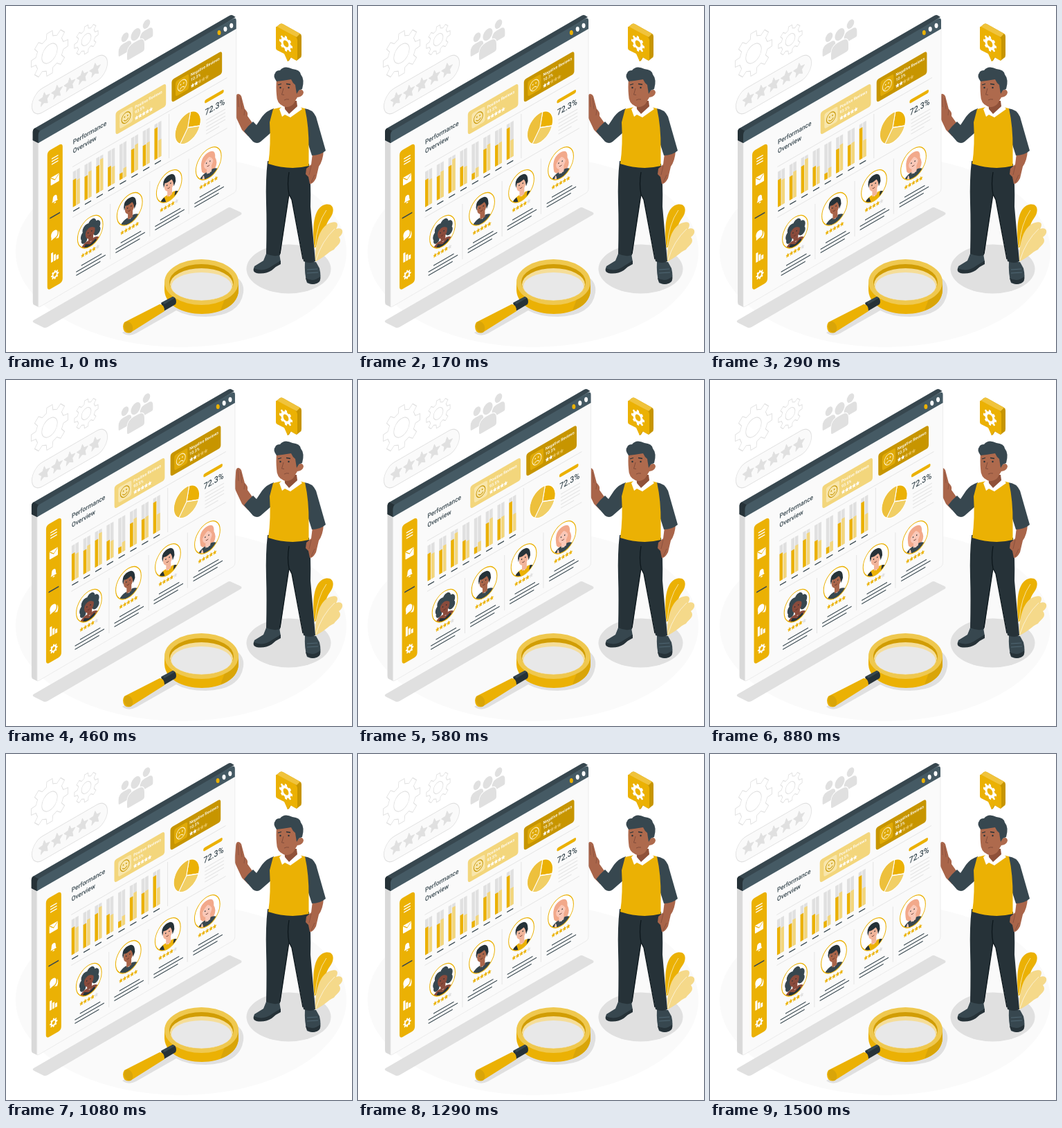
Animation of 500x500 px, one loop 1540 ms. Source, as an HTML page:

```html
<!DOCTYPE html>
<html lang="en">
<head>
<meta charset="utf-8">
<title>Performance overview</title>
<style>
  html, body { margin: 0; width: 100%; height: 100%; overflow: hidden; background: #fff; }
  svg { display: block; width: 100%; height: 100%; }
  text { font-family: Roboto, Inter, sans-serif; font-weight: 500; }
</style>
</head>
<body>
<svg viewBox="0 0 500 500">
  <defs><clipPath id="disc"><path d="M-21-30H21V0A21 21 0 0 1-21 0Z"/></clipPath></defs>

  <!-- floor and shadows -->
  <ellipse cx="253" cy="355" rx="239" ry="138" fill="#fafafa"/>
  <g fill="#e0e0e0">
    <path d="M40 454 320 292q3-2 6 0l13 6q3 2 0 4L60 464q-4 2-7 0l-12-6q-4-2-1-4Z"/>
    <ellipse cx="408.500" cy="380" rx="61" ry="35.500"/>
    <path d="M168 472 236 433Q226 412 250 390H330Q345 398 343 414 338 448 288 449 262 449 246 440L188 473Q177 479 168 472Z"/>
  </g>

  <g id="icons"></g>

  <!-- plant -->
  <path d="M446 350C442 322 444 291 461 287 474 284 476 297 468 307 459 319 463 330 446 350Z" fill="#ebb104"/>
  <path d="M447 369C446 344 453 317 470 313 481 310 480 318 477 322 488 318 489 329 481 334 487 342 478 346 474 352 466 355 458 365 447 369Z" fill="#f5d98a"/>
  <path d="M447 347Q449 315 463 295M448 367Q456 340 475 322" fill="none" stroke="#fff" stroke-width=".6"/>

  <!-- magnifier -->
  <path d="M229 399V411C230 433 256 445 283 445S335 433 336 411V399Z" fill="#ebb104"/>
  <path d="M310 440Q335 431 336 411V399H325Z" fill="#d9a508"/>
  <ellipse cx="282.500" cy="399" rx="53.500" ry="33" fill="#efc84f"/>
  <ellipse cx="282.500" cy="399.500" rx="46.500" ry="26.500" fill="#d19d04"/>
  <ellipse cx="282.500" cy="402.500" rx="45.500" ry="23.500" fill="#f5dd98"/>
  <ellipse cx="282.500" cy="405" rx="43.500" ry="20" fill="#e8e8e8"/>
  <path d="M224 429 241 420Q246 421 246 428L245 431 228 441Z" fill="#263238"/>
  <path d="M226 428 241 420 244 422 229 431Z" fill="#37474f"/>
  <path d="M171 457 222 431Q229 431 229 441L183 470Q176 475 171 470 167 463 171 457Z" fill="#ebb104"/>
  <ellipse cx="177" cy="464" rx="6" ry="8.500" transform="rotate(-20 177 464)" fill="#d9a508"/>

  <!-- man -->
  <path d="M376 358 395 358 397 370Q390 374 384 380 374 387 362 385 356 382 359 376L372 368Z" fill="#37474f"/>
  <path d="M358 379Q372 385 384 376L397 368V373Q390 376 384 382 374 388 362 386 356 384 358 379Z" fill="#263238"/>
  <path d="M432 369 448 370 453 379Q456 392 453 398 445 405 435 400 431 388 432 369Z" fill="#37474f"/>
  <path d="M433 393Q444 400 454 391 456 401 443 402 434 401 433 393Z" fill="#263238"/>
  <path d="M435 381 450 380M435 386 451 385" stroke="#607d8b" stroke-width=".6"/>
  <path d="M378 224 438 228Q441 255 440 290L447 369Q440 373 430 369L413 280 409 272 396 360Q387 363 376 358 377 315 376 285 375 250 378 224Z" fill="#263238"/>
  <path d="M409 240Q406 258 409 272L413 280 429 366M409 272 396 358" fill="none" stroke="#0d171c" stroke-width="1.300"/>
  <path d="M443 213 459 209Q458 224 452 232L448 249Q443 258 439 257L437 247 433 243 434 235 441 229Z" fill="#a9654a"/>
  <path d="M441 231 438 244M446 244 441 255" stroke="#7c4939" stroke-width=".7"/>
  <path d="M431 148Q443 149 448 160L462 209Q454 216 442 216L433 188Z" fill="#37474f"/>
  <path d="M350 188 341 179 333 162Q328 152 331 146L332 134Q332 128 335 127 340 127 341 134L345 149Q350 153 349 159L359 173Z" fill="#a9654a"/>
  <path d="M335 130 336 146M339 133 341 149M345 149 344 158" stroke="#7c4939" stroke-width=".6"/>
  <path d="M387 148Q377 151 370 160L362 172 357 167Q350 173 344 181L357 196Q363 200 368 196L384 182Z" fill="#37474f"/>
  <path d="M386 149 399 146 423 146 432 148Q438 175 437.500 207V231Q410 238 379 228 383 200 381 168Z" fill="#ebb104"/>
  <path d="M395 149 401 143 421 140 428 149 411 161 403 157 399 160Z" fill="#fff"/>
  <path d="M402 137H420L421 145 409 156 403 149Z" fill="#8f5139"/>
  <path d="M391 105Q390 118 391 128 391 141 401 145 408 148 415 142L421 132Q429 131 430 125 429 119 423 122L420 104Z" fill="#ae6a4d"/>
  <path d="M391 109Q385 101 389 97 390 93 396 93 402 85 414 91 425 92 426 99 432 106 428 120L423 122 420 127 418 114Q414 111 412 106 400 108 391 109Z" fill="#37474f"/>
  <path d="M393 114 398 112.500M405 112.500 411 113.500" stroke="#263238" stroke-width="1.300"/>
  <circle cx="396.500" cy="118" r="1.200" fill="#263238"/><circle cx="408.500" cy="118" r="1.200" fill="#263238"/>
  <path d="M401 119 398.500 128 402 128.500M402 136Q405 134 409 135" fill="none" stroke="#7c4939" stroke-width=".9"/>

  <!-- settings bubble -->
  <path d="M390 31 396 26Q398 25 400 26L425 40Q427 41 427 44V71Q427 74 425 75L420 79 412 74 409 79 407 80Z" fill="#c79500"/>
  <path d="M390 31 396 26Q398 25 400 26L425 40 420 45Z" fill="#f0c33c"/>
  <path d="M392 30 418 44Q421 46 421 49V76Q421 79 418 78L411 74 407 80 402 69 392 64Q390 63 390 61V32Q390 29 392 30Z" fill="#ebb104"/>
  <g id="cog"></g>

  <!-- browser window -->
  <g id="win">
    <path d="M39 191 47 197V435L41 432Q39 431 39 428Z" fill="#d9d9d9"/>
    <path d="M47 197 333 32V264Q333 268 330 270L52 433Q49 435 47 435Z" fill="#fafafa" stroke="#e6e6e6" stroke-width=".7"/>
    <path d="M39 182Q39 178 42 176.500L323 14Q326 12.500 328 13.500L332 16 60 188 47 198 39 194Z" fill="#37474f"/>
    <path d="M39 182Q39 178 42 176.500L50 181 47 186V198L39 194Z" fill="#263238"/>
    <path d="M47 187Q47 182 50 180L328 18.500Q333 16 333 21V33L47 198Z" fill="#455a64"/>
    <ellipse cx="308.300" cy="38.500" rx="2.500" ry="3.600" fill="#ebb104"/>
    <ellipse cx="317.200" cy="33.300" rx="2.500" ry="3.600" fill="#fff"/>
    <ellipse cx="326" cy="28.300" rx="2.500" ry="3.600" fill="#fff"/>
    <g id="page" transform="matrix(.866 -.5 0 1 47 199)"></g>
  </g>
</svg>

<script>
const $ = id => document.getElementById(id);
const gold = '#ebb104', pale = '#f3d67c', dark = '#37474f', grey = '#e0e0e0';

// ---- shape helpers ----
const polar = (r, a) => [r * Math.cos(a), r * Math.sin(a)].map(v => v.toFixed(2));
const star = (x, y, r, fill) => {
  const pts = Array.from({ length: 10 }, (_, i) => polar(i % 2 ? r * .48 : r, (i / 5 - .5) * Math.PI));
  return `<polygon transform="translate(${x} ${y})" points="${pts.join(' ')}" fill="${fill}" stroke="${fill}" stroke-width="${r * .12}" stroke-linejoin="round"/>`;
};
const gear = (r, hole, attrs, teeth = 8) => {
  const pts = [];
  for (let i = 0; i < teeth; i++)
    [[.76, -.30], [1, -.19], [1, .19], [.76, .30]].forEach(([k, d]) => pts.push(polar(r * k, (i + d) / teeth * 2 * Math.PI)));
  return `<path fill-rule="evenodd" stroke-linejoin="round" ${attrs} d="M${pts.join('L')}ZM${hole} 0A${hole} ${hole} 0 1 0 -${hole} 0A${hole} ${hole} 0 1 0 ${hole} 0Z"/>`;
};
const rect = (x, y, w, h, fill, rx = 0, more = '') =>
  `<rect x="${x}" y="${y}" width="${w}" height="${h}" rx="${rx}" fill="${fill}" ${more}/>`;
const line = (x1, y1, x2, y2, color, w) =>
  `<path d="M${x1} ${y1}L${x2} ${y2}" stroke="${color}" stroke-width="${w}"/>`;
const label = (x, y, size, fill, s) => `<text x="${x}" y="${y}" font-size="${size}" fill="${fill}">${s}</text>`;
const at = (x, y, s) => `<g transform="translate(${x} ${y})">${s}</g>`;
const iso = (x, y, s, dir = -1) => `<g transform="matrix(.866 ${dir * .5} 0 1 ${x} ${y})">${s}</g>`;
const stars = (x, y, gap, r, n, on, off) =>
  [0, 1, 2, 3, 4].map(i => star(x + i * gap, y, r, i < n ? on : off)).join('');
const person = k => `<g transform="scale(${k})"><ellipse cy="-15" rx="8.500" ry="8.500"/>
  <path d="M-15 14V7Q-15-4-4-4H4Q15-4 15 7V14Q15 17 12 17H-12Q-15 17-15 14Z"/></g>`;

// ---- loose icons ----
const thin = `fill="#fff" stroke="${grey}" stroke-width="1"`;
$('icons').innerHTML =
  iso(63, 68.500, gear(31, 13, thin)) + iso(116, 48.500, gear(20, 8, thin)) +
  iso(92, 113.500, rect(-63, -17.500, 126, 35, '#fafafa', 17.500, `stroke="${grey}"`) +
    stars(-42.400, 0, 21.200, 9.500, 5, grey)) +
  `<g fill="${grey}">${iso(203, 37, person(.72)) + iso(172, 56, person(.72))}
   <g stroke="#fff" stroke-width="2" paint-order="stroke">${iso(187.500, 55.500, person(.96))}</g></g>`;
$('cog').innerHTML = iso(404.500, 54.500, gear(11, 4.500, 'fill="#fff"'), 1);

// ---- page parts, in the plane of the window ----
const sidebar = () => rect(15, 19, 25.500, 201, gold, 5) + at(27.700, 0,
  [33, 37, 41].map(y => line(-5.500, y, 5.500, y, '#fff', 1.500)).join('') +
  rect(-7, 59.500, 14, 11.500, '#fff', 1) + `<path d="M-6.500 60.500 0 66 6.500 60.500" fill="none" stroke="${gold}"/>` +
  '<path d="M-5 97Q-3.500 96-3.500 92A3.500 4 0 0 1 3.500 92Q3.500 96 5 97ZM-1.500 98H1.500V99.500H-1.500Z" fill="#fff"/>' +
  line(-8.500, 117.500, 8.500, 117.500, dark, 1.800) +
  '<circle cx="-1" cy="144" r="5.500" fill="#fff"/><path d="M-6 151V145L0 149ZM1 151Q7 150 6 142 9 148 6 153Z" fill="#fff"/>' +
  rect(-6.500, 169, 3.500, 13.500, '#fff') + rect(-2, 173.500, 3.500, 9, '#fff') + rect(2.500, 176.500, 3.500, 6, '#fff') +
  at(0, 203, gear(6.500, 2.600, 'fill="#fff"')));

const card = (x, fill, tile, ink, title, value, n, dim, mouth) => at(x, 19,
  rect(0, 0, 84, 33, fill, 4) + rect(6.500, 5.500, 22, 22, tile, 3) +
  `<g fill="none" stroke="${ink}" stroke-width="1.100"><circle cx="17.500" cy="16.500" r="7.500"/><path d="${mouth}"/></g>
   <circle cx="15" cy="14.500" r="1" fill="${ink}"/><circle cx="20" cy="14.500" r="1" fill="${ink}"/>` +
  label(32, 11, 6.100, '#fff', title) + label(32, 18.500, 6.100, '#fff', value) +
  stars(35, 25.500, 6, 3, n, '#fff', dim));

const levels = [[39, 36], [34, 38], [39, 46], [28, 25], [9, 14], [34, 38], [30, 31], [45, 25]];
const chart = () => levels.map(([a, b], i) => at(57.700 + i * 19.430, 120.500,
  [[0, a, gold], [6.300, b, pale]].map(([x, h, c]) =>
    rect(x, -51, 5.300, 51, grey) + rect(x, -h, 5.300, h, c)).join('') +
  line(.5, 6, 11, 6, dark, 1.500))).join('');

const slice = (from, to, fill) => {
  const [a, b] = [from, to].map(d => polar(21.500, d * Math.PI / 180));
  return `<path d="M0 0L${a}A21.500 21.500 0 0 1 ${b}Z" fill="${fill}" stroke="#fff" stroke-width="1.300"/>`;
};
const pie = () => at(249.400, 101.500, slice(-78, 20, gold) + slice(20, 127, '#f1cf66') + slice(127, 282, '#edc03c'));

const stat = () => rect(277.500, 76, 32, 5, gold, 2.500) + label(278, 98.500, 12.300, dark, '72.3%') +
  [0, 1, 2, 3, 4].map(i => line(280, 106 + i * 5, i > 3 ? 302 : 312, 106 + i * 5, grey, .9)).join('');

const head = (skin, y = -2) => `<path d="M-3 ${y + 5}H5V14H-3Z" fill="${skin}"/><ellipse cx="0" cy="${y}" rx="8" ry="9.500" fill="${skin}"/>
  <g fill="#263238"><circle cx="-3.500" cy="${y}" r=".9"/><circle cx="2.500" cy="${y}" r=".9"/></g>
  <path d="M-2.500 ${y + 5}q2 1.200 4 0" fill="none" stroke="#5d2f25" stroke-width=".8"/>`;
const bust = (c, y = 11) => `<path d="M-18 24Q-17 ${y + 1}-4 ${y}L1 ${y + 4} 6 ${y}Q18 ${y + 2} 19 24Z" fill="${c}"/>`;
const cap = c => `<path d="M-9-2Q-12-14-4-16 11-18 11-2L8 4Q7-5 4-8-3-6-7-8Z" fill="${c}"/>`;
const faces = [
  `<g fill="${dark}"><circle cx="-9" cy="1" r="7"/><circle cx="-6" cy="-7" r="7"/><circle cx="3" cy="-10" r="7"/><circle cx="10" cy="-4" r="7"/><circle cx="11" cy="4" r="6"/><circle cx="-10" cy="7" r="5"/></g>` +
    bust('#8a4b3c') + head('#8a4b3c', 0) + `<path d="M-13 24-8 14 0 18 9 14 14 24Z" fill="#263238"/><path d="M-8-2Q-2-11 8-2L7-9-4-11Z" fill="${dark}"/>`,
  bust(dark) + head('#a9654a', -3) + cap('#263238'),
  bust(gold) + '<path d="M-18 24Q-15 13-8 12L-4 24ZM10 12Q19 14 19 24H8Z" fill="#263238"/>' + head('#f2b59b', -3) + cap('#263238'),
  '<path d="M-11 7Q-16-14-3-16 12-17 11-3 16 6 11 12L-7 11Z" fill="#f2a98b"/>' + bust(dark) + head('#fac8b8') +
    '<path d="M-9-1Q-9-13 0-14 10-13 9 1 5-7 1-9-4-8-9-1Z" fill="#f2a98b"/><path d="M-13 24-9 13Q-6 15-7 24Z" fill="#fac8b8"/>'
];
const profile = (art, i) => at(86.600 + i * 65.820, 170.500,
  `<circle r="21" fill="#fff"/><g clip-path="url(#disc)">${art}</g><circle r="21.200" fill="none" stroke="${gold}" stroke-width="1.200"/>` +
  stars(-12.400, 28, 6.200, 3, i % 2 ? 5 : 4, gold, grey) +
  line(-15, 41.500, 19, 41.500, dark, 1.300) + line(-23.500, 46.500, 25.500, 46.500, dark, 1.300) + line(-23.500, 51.500, 17, 51.500, dark, 1.300));

const rules = [[57, 62, 315, 62], [218, 66, 218, 130], [57, 135, 315, 135],
  [120, 147, 120, 227], [186, 147, 186, 227], [251, 147, 251, 227]];
$('page').innerHTML = sidebar() +
  label(57.700, 30, 9.600, dark, 'Performance') + label(57.700, 43, 9.600, dark, 'Overview') +
  card(129, pale, '#f8e6ac', '#c79500', 'Positive Reviews', '93.5%', 5, '#fff', 'M13.500 18.500Q17.500 23 21.500 18.500') +
  card(222.500, '#c79500', '#e0aa08', '#fdf0c8', 'Negative Reviews', '10.3%', 2, '#e3bd55', 'M13.500 21Q17.500 16.500 21.500 21') +
  rules.map(r => line(...r, grey, .8)).join('') +
  chart() + pie() + stat() + faces.map(profile).join('');

// ---- sideways shake: one value per tenth of the loop ----
const shake = [0, -1, 2, -4, 4, -4, 4, -4, 2, -1, 0];
const loop = 1540, count = 37;

function draw() {
  const step = Math.floor((performance.now() + 4) % loop / loop * count);
  const p = (step + 1) / count * 10, i = Math.min(9, Math.floor(p));
  const x = shake[i] + (shake[i + 1] - shake[i]) * (p - i);
  $('win').setAttribute('transform', `translate(${x.toFixed(3)} 0)`);
  requestAnimationFrame(draw);
}
draw();
</script>
</body>
</html>
```
